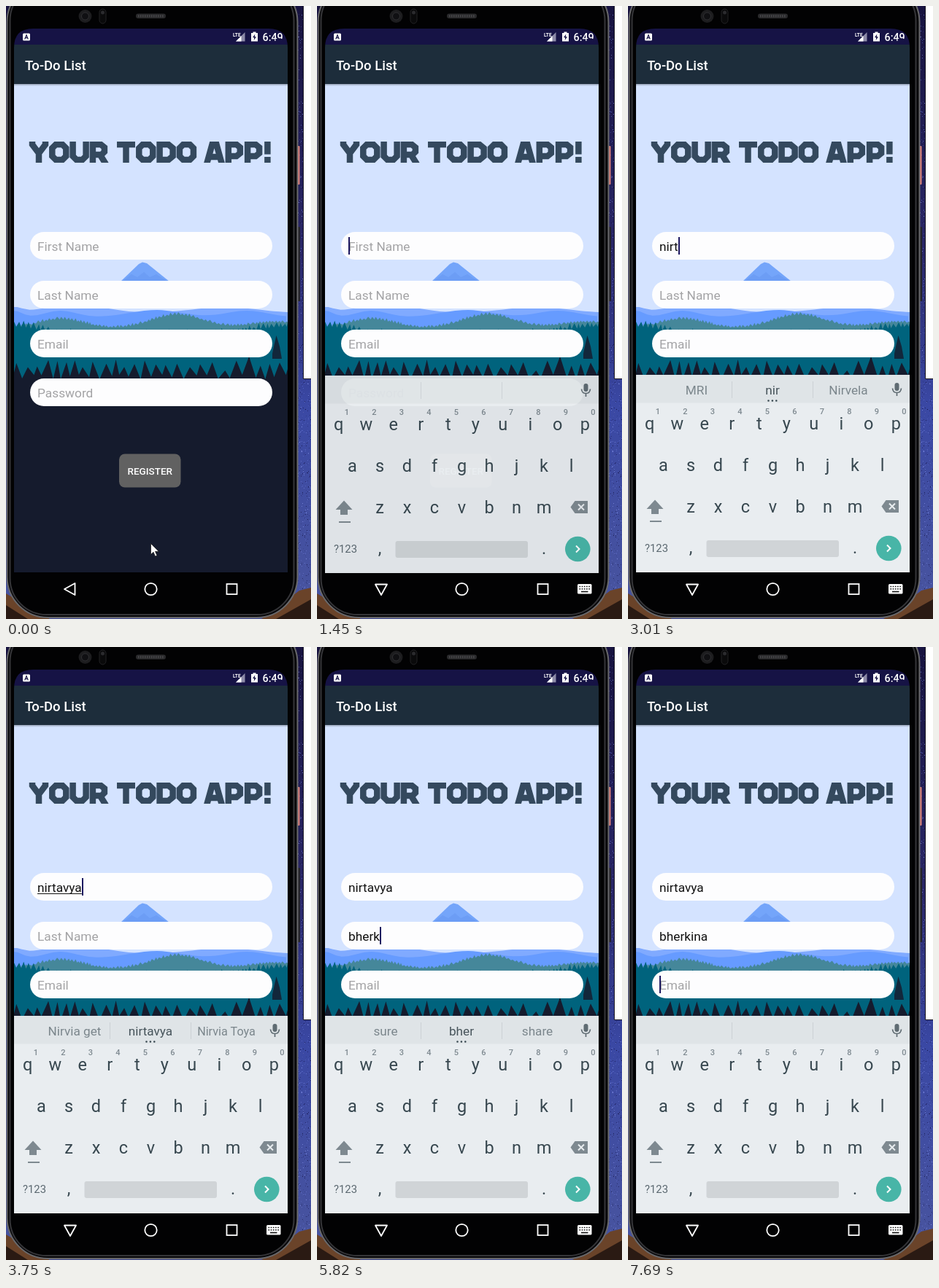
These frames come from a looping animation (418x841 px, 8 s). An HTML page:

```html
<!DOCTYPE html>
<html lang="en">
<head>
<meta charset="utf-8">
<title>To-Do List sign-up</title>
<style>
html, body { margin: 0; width: 100%; height: 100%; overflow: hidden; background: #1b1648; }
svg { display: block; width: 418px; height: 841px; }
text { font-family: Roboto, Arial, sans-serif; white-space: pre; }
.mid { text-anchor: middle; }
</style>
</head>
<body>
<svg id="stage" viewBox="0 0 418 841" xmlns="http://www.w3.org/2000/svg">
  <defs>
    <linearGradient id="night" x1="0" y1="0" x2="0" y2="1">
      <stop offset="0" stop-color="#17133f"/>
      <stop offset=".4" stop-color="#2a2768"/>
      <stop offset=".65" stop-color="#3a48a4"/>
      <stop offset=".95" stop-color="#47539f"/>
    </linearGradient>
    <linearGradient id="shade" x1="0" y1="0" x2="0" y2="1">
      <stop offset="0" stop-color="#000" stop-opacity=".28"/>
      <stop offset="1" stop-color="#000" stop-opacity="0"/>
    </linearGradient>
    <clipPath id="screen"><path d="M11 778V57Q11 31 37 31H360Q386 31 386 57V778Z"/></clipPath>
    <clipPath id="caps"><rect x="30" y="186" width="340" height="29"/></clipPath>
  </defs>
  <rect width="418" height="841" fill="url(#night)"/>
  <g id="stars"></g>
  <path d="M0 806L60 841H0ZM418 798L402 802 350 841H418Z" fill="#6a4329"/>
  <path d="M0 822L30 841H0ZM418 814L370 841H418Z" fill="#2a1a13"/>
  <path d="M407.500 -1V511.500H419V-1Z" fill="#fff" stroke="#15131f"/>

  <g id="phone">
    <rect x="399" y="192" width="3.500" height="53" rx="1" fill="#e0837c"/>
    <rect x="399" y="303" width="4" height="102" rx="1" fill="#25242b"/>
    <rect x="1.500" y="-34" width="398" height="873" rx="56" fill="#08080a" stroke="#68686b" stroke-width="2"/>
    <rect x="5.500" y="-30" width="389" height="865" rx="50" fill="#020203" stroke="#353538" stroke-width="2"/>
    <circle cx="108.500" cy="14" r="9" fill="#1d1d1f"/>
    <circle cx="108.500" cy="14" r="5" fill="#101013" stroke="#303033"/>
    <rect x="128" y="4" width="9" height="20" rx="4.500" fill="#0a0a0b" stroke="#232325"/>
    <path d="M132.500 9V19" stroke="#2b2b2e" stroke-width="5" stroke-linecap="round" stroke-dasharray="0 10"/>
    <rect x="178" y="10.500" width="41" height="6.500" rx="3.200" fill="#2a2a2c"/>
    <path d="M181 13.700H216" stroke="#48484b" stroke-width="3" stroke-dasharray="1.500 1.500"/>
  </g>

  <g clip-path="url(#screen)">
    <rect x="11" y="107" width="375" height="670" fill="#d4e3ff"/>
    <g id="land"></g>
    <rect x="11" y="31" width="375" height="22" fill="#161345"/>
    <rect x="11" y="53" width="375" height="54" fill="#1d2d3b"/>
    <rect x="11" y="107" width="375" height="3" fill="url(#shade)"/>
    <rect x="23" y="37.500" width="10" height="10" rx="1.500" fill="#fff"/>
    <path d="M25.700 45.500L28 39.800 30.300 45.500M26.500 43.700H29.500" fill="none" stroke="#161345" stroke-width="1.200"/>
    <text x="311" y="41.500" font-size="6.500" font-weight="700" fill="#fff">LTE</text>
    <path d="M327.500 36V48.500H315Z" fill="#8d8ba8"/>
    <path d="M322.500 41V48.500H315Z" fill="#fff"/>
    <path d="M338.500 35.500H342.500V37H345V48.500H336V37H338.500Z" fill="#fff"/>
    <path d="M341.300 38.500L338 43.300H340.200L339.700 47 343 42.200H340.800Z" fill="#161345"/>
    <text x="351.500" y="47.500" font-size="14.300" font-weight="500" fill="#fff">6:49</text>
    <rect x="369.500" y="45" width="9" height="4" fill="#161345"/>
    <text x="26" y="87.600" font-size="18.500" font-weight="500" fill="#fff">To-Do List</text>
    <g clip-path="url(#caps)"><g id="heading" fill="none" stroke="#34495e" stroke-width="8.500"></g></g>
    <g id="fields"></g>
    <rect x="155" y="614.500" width="84.500" height="46" rx="8" fill="#616161"/>
    <text class="mid" x="197.300" y="642.700" font-size="13.500" font-weight="500" fill="#fff">REGISTER</text>
    <g id="board"></g>
  </g>

  <g fill="none" stroke="#fff" stroke-width="1.800">
    <path id="back" d="M80 800L94.500 792V808Z" stroke-linejoin="round"/>
    <circle cx="198.500" cy="800" r="8.200"/>
    <rect x="302.500" y="793" width="14" height="14"/>
  </g>
  <g id="switch">
    <rect x="357" y="793" width="19.500" height="13.500" rx="1.500" fill="#fff"/>
    <path d="M359.500 796.500H374M359.500 799.800H374" stroke="#111" stroke-width="1.600" stroke-dasharray="1.600 1.600"/>
    <path d="M362 803.500H371.500" stroke="#111" stroke-width="1.600"/>
  </g>
  <path id="pointer" d="M.5 .5V15.500L4 12.200 6.500 18 9 17 6.500 11.300H11.300Z" fill="#fff" stroke="#222" stroke-width=".8"/>
</svg>

<script>
const $ = id => document.getElementById(id);
const LOOP = 8000;
let seed = 11;
const rnd = (a = 0, b = 1) => {
  seed = (seed * 16807) % 2147483647;
  return a + (b - a) * seed / 2147483647;
};
const clamp = v => Math.max(0, Math.min(1, v));
const mix = (a, b, p) => a + (b - a) * p;
const times = (n, f) => Array.from({ length: n }, (_, i) => f(i)).join('');
const shape = (d, fill) => `<path d="${d}" fill="${fill}"/>`;
const label = (x, y, size, fill, s, extra = '') =>
  `<text class="mid" x="${x}" y="${y}" font-size="${size}" fill="${fill}" ${extra}>${s}</text>`;

// Wallpaper
$('stars').innerHTML = times(1100, i =>
  `<rect x="${rnd(399, 418).toFixed(0)}" y="${rnd(0, 812).toFixed(0)}" width="1" height="1" ` +
  `fill="${['#8f9cf0', '#0f0c38', '#6270d0', '#1c1a58'][i % 4]}" opacity="${rnd(.2, .8).toFixed(2)}"/>`);

// Landscape: each layer is a height formula with random treetops
const hump = (x, mid, width) => Math.exp(-(((x - mid) / width) ** 2));
function ridge(height, fill, up, step) {
  let d = 'M11 777';
  for (let x = 9, tip = 0; x < 390; x += rnd(step * .6, step * 1.4), tip = 1 - tip)
    d += `L${x.toFixed(1)} ${(height(x) - tip * rnd(up * .4, up)).toFixed(1)}`;
  return shape(d + 'V777Z', fill);
}
$('land').innerHTML =
  shape('M157 378L182 354 187 351.500 193 353 224 378Z', '#74a5fa') +
  shape('M160 377L172 368 180 372 189 365 197 372 206 368 222 378Z', '#6c9df5') +
  ridge(x => 421 - 12 * hump(x, 95, 55) - 8 * hump(x, 300, 60) - 7 * hump(x, 11, 15), '#80aaff', 0, 8) +
  ridge(x => 427 - 9 * hump(x, 75, 30) - 10 * hump(x, 205, 50) - 9 * hump(x, 330, 40) - 9 * hump(x, 11, 15), '#669bff', 0, 8) +
  ridge(x => 443 - 13 * hump(x, 75, 45) - 19 * hump(x, 235, 50) - 9 * hump(x, 370, 50), '#45879a', 4, 2.5) +
  ridge(x => 453 - 13 * hump(x, 11, 50) - 13 * hump(x, 388, 70), '#00637d', 10, 3) +
  ridge(x => 509 + 3 * Math.sin(x / 9), '#151b2d', 27, 7) +
  shape('M365 484V477L367 467 370.500 452 375 467 378 484Z', '#12273b');

// Heading: thick strokes on a 29 px cap height
const bowl = 'M4 30V4H15L20 8';
const glyphs = {
  Y: [26, 'M4 -3V4L13 16 22 4V-3M13 14V30'],
  O: [27, 'M9 4H18L23 9V20L18 25H9L4 20V9Z'],
  U: [26, 'M4 -1V20L9 25H17L22 20V-1'],
  R: [26, bowl + 'V14L16 18H4M14 18L22 31'],
  T: [25, 'M0 4H25M12.500 4V30'],
  D: [26, 'M4 4H16L22 9V20L16 25H4Z'],
  A: [28, 'M3.500 31L11 4H17L24.500 31M8 21H20'],
  P: [25, bowl + 'V16L15 20H4'],
  '!': [10, 'M5 0V17.500M5 21V30']
};
function word(s, x) {
  return [...s].map(c => {
    const [w, d] = glyphs[c], at = x;
    x += w + 1.3;
    return `<path transform="translate(${at} 186)" d="${d}"/>`;
  }).join('');
}
$('heading').innerHTML = word('YOUR', 32) + word('TODO', 152) + word('APP!', 271.5);

// Form
const hints = ['First Name', 'Last Name', 'Email', 'Password'];
$('fields').innerHTML = hints.map((h, i) => `<g transform="translate(0 ${i * 67})">
  <rect x="33" y="310" width="332" height="38" rx="19" fill="#fdfdfe"/>
  <text id="hint${i}" x="43" y="335.700" font-size="17.300" fill="#a3a3a5">${h}</text>
  <text id="text${i}" x="43" y="335.700" font-size="17.300" fill="#111"></text>
  <path id="line${i}" stroke="#111"/>
  <rect id="caret${i}" y="317" width="2" height="24" fill="#1c1760"/></g>`).join('');

// Keyboard
const ink = '#37474f', soft = '#7e8990', PITCH = 37.5;
const row = (s, x, y) => [...s].map((c, i) => label(x + i * PITCH, y, 23.5, ink, c)).join('');
$('board').innerHTML = `
  <rect x="11" y="506" width="375" height="271" fill="#e9edf0"/>
  <rect x="11" y="506" width="375" height="38.500" fill="#dfe4e7"/>
  <path d="M142.500 515V538M253.500 515V538" stroke="#cbd1d5"/>
  ${times(3, i => label(94 + i * 104, 532.8, 17.2, i === 1 ? '#47545b' : '#7b868c', '', `id="word${i}"`))}
  <path id="dots" d="M192.500 541.500H204.500" stroke="#37474f" stroke-width="2.600" stroke-linecap="round" stroke-dasharray="0 5.400"/>
  <rect x="365.500" y="517" width="6" height="11" rx="3" fill="#5f6b72"/>
  <path d="M362.500 524.500Q363 530.500 368.500 530.500T374.500 524.500M368.500 530.500V535" fill="none" stroke="#5f6b72" stroke-width="1.700"/>` +
  row('qwertyuiop', 29.8, 580.5) + row('asdfghjkl', 48.5, 638) + row('zxcvbnm', 86, 695) +
  times(10, i => label(41 + i * PITCH, 560, 11, soft, (i + 1) % 10, 'font-weight="500"')) +
  shape('M37 677.500L48.500 690H42V697H32V690H25.500ZM30 706H46V708H30Z', soft) +
  shape('M347.500 686.500L353.500 678H371V695H353.500Z', soft) +
  `<path d="M358 682.500L366 690.500M366 682.500L358 690.500" stroke="#e9edf0" stroke-width="2"/>` +
  label(39, 749, 14.8, '#5b6870', '?123') + label(86, 751, 23.5, ink, ',') + label(311, 751, 23.5, ink, '.') +
  `<rect x="107.500" y="733" width="181.500" height="23" rx="3" fill="#d0d4d7"/>
  <circle cx="357.300" cy="744" r="17.300" fill="#48b5a7"/>
  <path d="M355 739.500L359.500 744 355 748.500" fill="none" stroke="#fff" stroke-width="2"/>`;

// Timeline: each entry is focused, typed at a steady pace, then left
const LAG = 100;
const entries = [
  { focus: 1060, start: 2620, pace: 128, word: 'nirtavya', early: ['MRI', 'Nirvela'], late: ['Nirvia get', 'Nirvia Toya'] },
  { focus: 4000, start: 5160, pace: 162, word: 'bherkina', early: ['sure', 'share'], late: ['sure', 'sharing'] },
  { focus: 6680, start: Infinity, pace: 1, word: '' }
];
const show = (el, on) => el.setAttribute('visibility', on ? 'visible' : 'hidden');
const typedAt = (e, t) => t < e.start ? '' : e.word.slice(0, 1 + Math.floor((t - e.start) / e.pace));
const focusAt = t => entries.filter(e => e.focus <= t).pop();

function drawField(i, t) {
  const e = entries[i], active = e && focusAt(t) === e;
  const typed = e ? typedAt(e, t) : '';
  $('text' + i).textContent = typed;
  const end = 43 + (typed ? $('text' + i).getComputedTextLength() : 0);
  show($('hint' + i), !typed);
  $('caret' + i).setAttribute('x', Math.round(end));
  show($('caret' + i), active && (typed || (t - e.focus) % 1000 < 520));
  $('line' + i).setAttribute('d', `M43 338.5H${end.toFixed(1)}`);
  show($('line' + i), active && t > e.start + e.word.length * e.pace + LAG);
}

function drawGuesses(t) {
  const e = focusAt(t), typed = e ? typedAt(e, t) : '';
  const on = typed.length > 1;
  const [left, right] = on ? (typed.length < 5 ? e.early : e.late) : ['', ''];
  [left, on ? typed : '', right].forEach((s, i) => {
    $('word' + i).textContent = s;
    $('word' + i).setAttribute('font-size', s.length > 10 ? 16.2 : 17.2);
  });
  show($('dots'), on);
}

// The pointer swings up and left, then settles on the first field
function drawPointer(t) {
  const q = t < 250 ? 0 : 250 + Math.floor((t - 250) / 130) * 130;
  const rise = clamp((q - 150) / 360) ** 1.6;
  const settle = 1 - (1 - clamp((q - 510) / 390)) ** 2;
  const x = mix(mix(198, 127, Math.sqrt(rise)), 157, settle);
  const y = mix(mix(737, 387, rise), 332, settle);
  $('pointer').setAttribute('transform', `translate(${x.toFixed(1)} ${y.toFixed(1)})`);
  show($('pointer'), t < entries[0].focus);
}

function render(t) {
  hints.forEach((_, i) => drawField(i, t));
  drawGuesses(t - LAG);
  drawPointer(t);

  const rising = t < 1570;
  show($('board'), t >= 1450);
  $('board').setAttribute('opacity', rising ? .955 : 1);
  $('board').setAttribute('transform', `translate(0 ${rising ? 1 : 0})`);

  const nav = clamp(Math.floor((t - 1060) / 120) / 2);
  $('back').setAttribute('transform', `rotate(${-90 * nav} 88 800)`);
  $('switch').setAttribute('opacity', nav);
}

const start = performance.now();
function tick() {
  render((performance.now() - start) % LOOP);
  requestAnimationFrame(tick);
}
tick();
</script>
</body>
</html>
```
